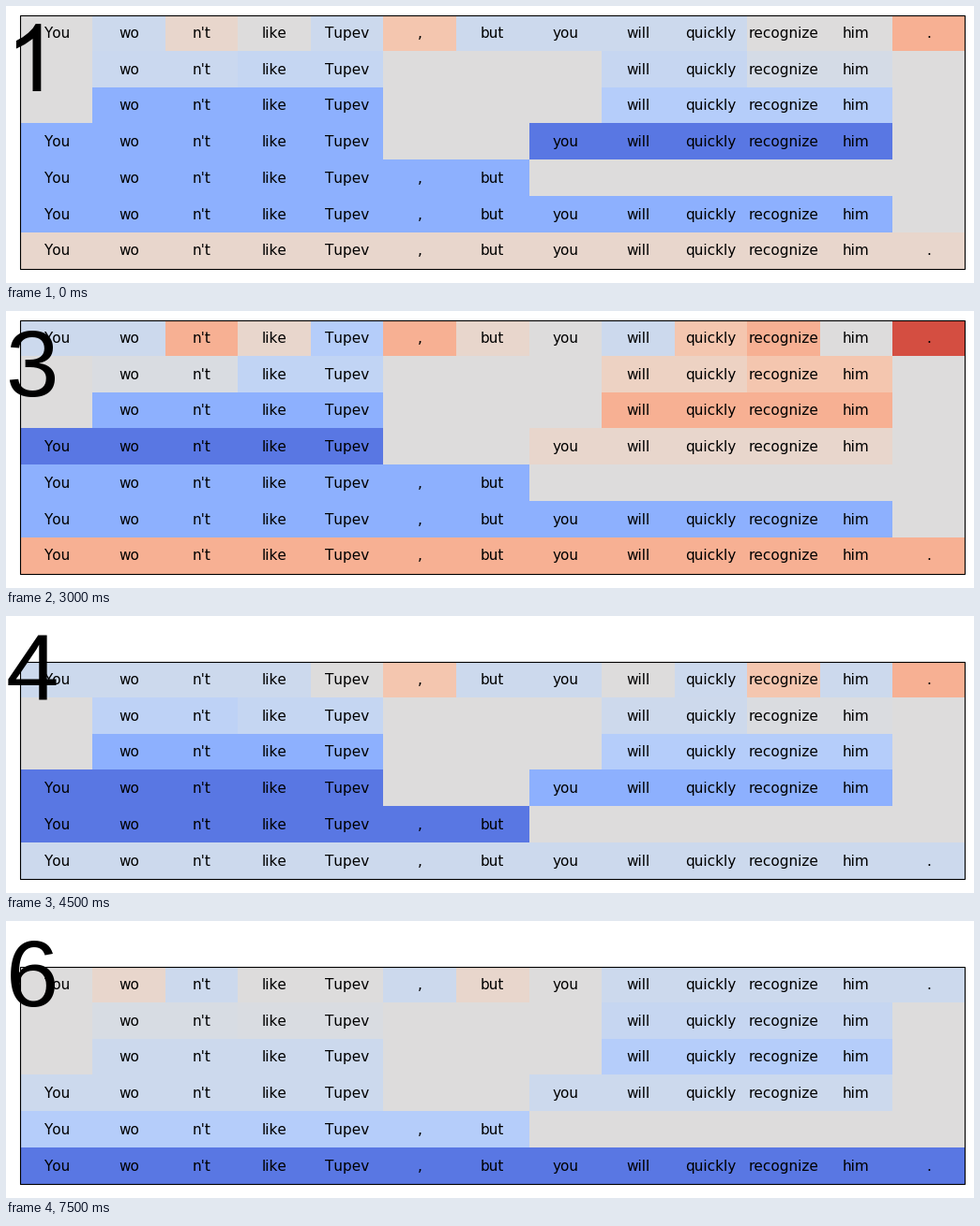
Animation, 1032 px wide and 296 px high, one loop 8 s. Source, as a matplotlib script:

```python
from math import ceil

import matplotlib.pyplot as plt
from matplotlib.animation import FuncAnimation
from matplotlib.patches import Polygon, Rectangle

WIDTH, HEIGHT, DPI = 1032, 296, 100
LEFT, BOTTOM, CELL_W, CELL_H = 15, 281.25, 77.5, 38.75
BASELINE = 91
STEP_MS, STEPS_PER_LAYER = 500, 3

WORDS = "You wo n't like Tupev , but you will quickly recognize him .".split()

# Named positions on the diverging cold-to-warm scale.
TONES = dict(navy=.1, blue=.25, sky=.365, mist=.44, grey=.5,
             sand=.545, peach=.62, coral=.69, red=.91)

# Word spans (start, end) of the tree rows under the single words.
PHRASES = [(1, 3), (3, 5), (8, 10), (10, 12)]
VERBS = [(1, 5), (8, 12)]
CLAUSES = [(0, 5), (7, 12)]
CONTRAST, STATEMENT, SENTENCE = [(0, 7)], [(0, 12)], [(0, 13)]
PARENT_PULL = 0.25

# Per layer: words that are not grey, then tones of the spans from VERBS down.
LAYERS = [
    (dict(mist="wo Tupev but you will quickly", sand="n't", peach=",", coral="."),
     "blue sky blue navy blue blue sand"),
    (dict(mist="wo like Tupev", sand="will recognize", peach=",", coral="."),
     "mist grey sky sand sand red"),
    (dict(mist="You wo will", sky="Tupev", sand="like but", peach="quickly",
          coral="n't , recognize", red="."),
     "blue coral navy sand blue blue coral"),
    (dict(mist="You wo n't like but you quickly him", peach=", recognize", coral="."),
     "blue sky navy blue navy mist"),
    (dict(mist="wo n't Tupev but you him", sand=".", peach="You recognize",
          coral="quickly"),
     "navy red navy peach navy sky coral"),
    (dict(mist="n't , will quickly recognize him .", sand="wo but"),
     "mist sky mist mist sky navy"),
]

ONE = [(37.3, 0), (28.5, 0), (28.5, 56), (20, 50), (10.9, 45.4), (10.9, 53.9),
       (17.8, 57.7), (23.8, 62.3), (28.6, 67.2), (31.6, 71.9), (37.3, 71.9)]

plt.rcParams["text.kerning_factor"] = 6  # whole-pixel kerning
fig = plt.figure(figsize=(WIDTH / DPI, HEIGHT / DPI), dpi=DPI, facecolor="white")
ax = fig.add_axes([0, 0, 1, 1])


def tree_rows(index):
    """Rows of (span, score) pairs, from single words down to the sentence."""
    tinted, trunk = LAYERS[index]
    tone_of = {word: tone for tone, words in tinted.items() for word in words.split()}
    leaves = [TONES[tone_of.get(word, "grey")] for word in WORDS]
    scores = iter(TONES[tone] for tone in trunk.split())

    middle = [STATEMENT] if index % 2 == 0 else []
    lower = [[(span, next(scores)) for span in spans]
             for spans in [VERBS, CLAUSES, CONTRAST, *middle, SENTENCE]]

    # A phrase averages its words, pulled towards the verb group below it.
    phrases = []
    for i, (start, end) in enumerate(PHRASES):
        mean = sum(leaves[start:end]) / (end - start)
        parent = lower[0][i // 2][1]
        phrases.append(((start, end), mean + PARENT_PULL * (parent - mean)))

    words = [((i, i + 1), score) for i, score in enumerate(leaves)]
    return [words, phrases, *lower]


def column_edge(col):
    return round(LEFT - 0.1 + col * CELL_W * 1.0002)


def row_edge(y):
    return int(y - 0.35)


def fill(start, end, top, bottom, score):
    x = column_edge(start)
    ax.add_patch(Rectangle((x, top), column_edge(end) - x, bottom - top,
                           facecolor=plt.cm.coolwarm(score), linewidth=0,
                           antialiased=False))


def draw_row(row, top, frame_top):
    y0, y1 = max(frame_top, row_edge(top)), row_edge(top + CELL_H)
    fill(0, len(WORDS), y0, y1 + 1, TONES["grey"])
    for (start, end), score in row:
        fill(start, end, y0, y1 + 1, score)
        for col in range(start, end):
            ax.text(LEFT + (col + 0.5) * CELL_W, top + CELL_H / 2, WORDS[col],
                    fontsize=11, family="DejaVu Sans", ha="center", va="center")


def draw_number(number):
    if number == 1:
        ax.add_patch(Polygon([(x, BASELINE - y) for x, y in ONE],
                             facecolor="black", linewidth=0))
    else:
        ax.text(-0.5, BASELINE, str(number), fontsize=73,
                family="Liberation Sans", va="baseline")


def draw(step):
    index = step // STEPS_PER_LAYER
    ax.clear()
    ax.set(xlim=(0, WIDTH), ylim=(HEIGHT, 0))
    ax.axis("off")
    rows = tree_rows(index)
    top = ceil(BOTTOM - len(rows) * CELL_H)
    for i, row in enumerate(rows):
        draw_row(row, top + i * CELL_H, top)
    ax.add_patch(Rectangle((LEFT, top), len(WORDS) * CELL_W - 0.5, int(BOTTOM) - top,
                           fill=False, edgecolor="black", linewidth=0.8))
    draw_number(index + 1)
    return []


animation = FuncAnimation(fig, draw, frames=16, interval=STEP_MS,
                          init_func=lambda: draw(0), repeat=True, repeat_delay=0)
plt.show()
```
